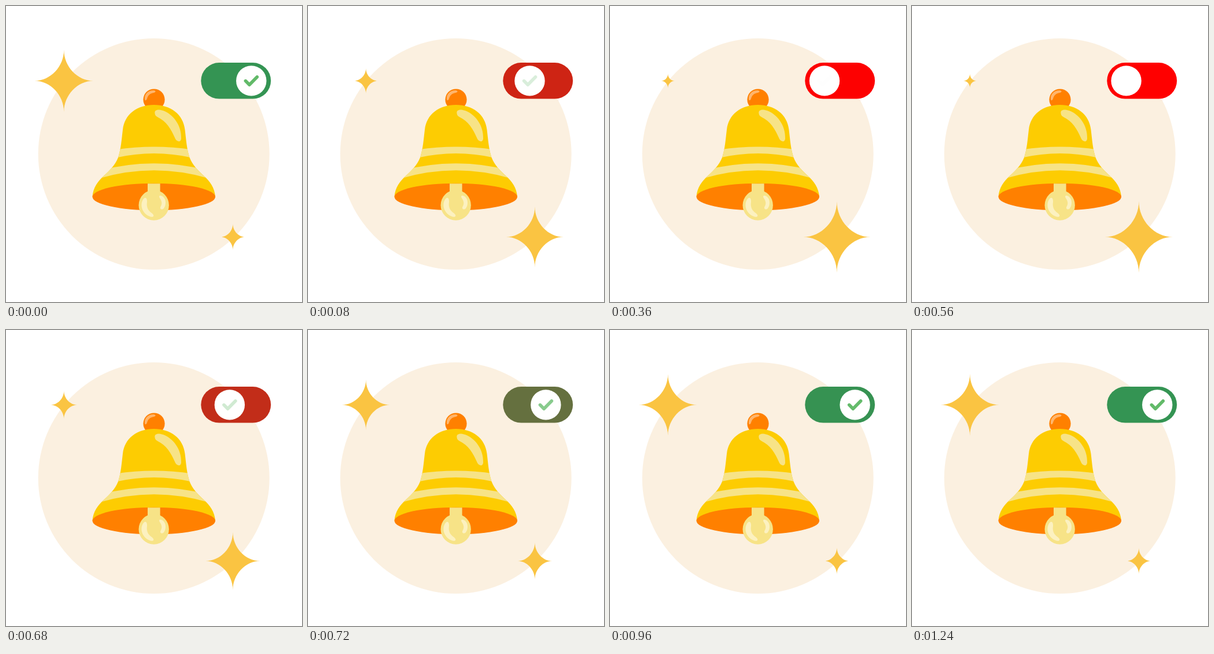
An HTML page with a canvas that plays this animation: 512 px wide and 512 px high, repeating every 1380 ms.

```html
<!DOCTYPE html>
<html lang="en">
<head>
<meta charset="utf-8">
<title>Notification toggle</title>
<style>
  html, body { margin: 0; width: 100%; height: 100%; overflow: hidden; background: #fff; }
  canvas { display: block; width: 100vmin; height: 100vmin; }
</style>
</head>
<body>
<canvas id="stage" width="512" height="512"></canvas>
<script>
const ctx = document.getElementById('stage').getContext('2d');
const LOOP = 1380, FLIP = 640, STEP = 40;
const GOLD = '#fac442', YELLOW = '#fdcc02', CREAM = '#f7e387', PALE = '#fcf1c0', ORANGE = '#ff8000';
const ON = [52, 148, 83], OFF = [255, 0, 0];

const body = new Path2D(`M255.8 171 C227 171 205 187 202 214 C200 230 199 247 194 262
  C189 275 179 285 169 294 C159 303 150.5 314 149.5 330 H362
  C361 314 352.5 303 342.5 294 C332.5 285 322.5 275 317.5 262
  C312.5 247 311.5 230 309.5 214 C306.5 187 284.5 171 255.8 171 Z`);
const bands = new Path2D(`M190 248.5 Q256 238.5 322 248.5 V262.5 Q256 247.5 190 262.5 Z
  M160 285 Q256 259.5 352 285 V298.5 Q256 270 160 298.5 Z`);
const bodyShine = new Path2D(`M257.5 186 C256 179 264 178 272 181 C288 187 304 205 303 230
  C302 236 296 235 293 230 C285 212 278 200 262 192 C259 190 258 189 257.5 186 Z`);
const knobShine = new Path2D(`M240 161 C239 152 247 145 256 146 C260 147 259 149 256 150
  C249 151 246 154 244 160 C243 164 240 164 240 161 Z`);
const clapperShine = new Path2D(`M238.5 333 C231 341 233.5 359 250 364.5 C256 366 257 362 252.5 358.5
  C244 353 243 346 244 339 C244.5 333 241.5 330 238.5 333 Z
  M267 328 C276.5 329 278.5 343 273 350 C269.5 353.5 265.5 351 267.5 347
  C270.5 342 269.5 338 266.5 333 C264.5 330 264.5 328 267 328 Z`);

const lerp = (a, b, p) => a + (b - a) * p;
const clamp = v => Math.min(1, Math.max(0, v));

function fill(path, color) {
  ctx.fillStyle = color;
  ctx.fill(path);
}

function oval(x, y, rx, ry, color) {
  const path = new Path2D();
  path.ellipse(x, y, rx, ry, 0, 0, Math.PI * 2);
  fill(path, color);
}

// Underdamped spring from 0 to 1, time in ms
function spring(ms) {
  const t = ms / 1000, decay = 13.75, freq = decay * Math.SQRT2;
  return 1 - Math.exp(-decay * t) * (Math.cos(freq * t) + decay / freq * Math.sin(freq * t));
}

// Four tips joined by concave arcs
function star(x, y, rx, ry) {
  const bend = 0.46;
  const tips = [[0, -1], [1, 0], [0, 1], [-1, 0]];
  const path = new Path2D();
  path.moveTo(x, y - ry);
  tips.forEach(([ax, ay], i) => {
    const [bx, by] = tips[(i + 1) % 4];
    path.bezierCurveTo(
      x + ax * bend * rx, y + ay * bend * ry,
      x + bx * bend * rx, y + by * bend * ry,
      x + bx * rx, y + by * ry);
  });
  fill(path, GOLD);
}

function bell() {
  oval(256, 162, 18.6, 18.6, ORANGE);
  fill(knobShine, '#ffb56b');
  fill(body, YELLOW);
  ctx.save();
  ctx.clip(body);
  fill(bands, CREAM);
  ctx.restore();
  fill(bodyShine, CREAM);
  oval(255.8, 330.1, 106.3, 23.3, ORANGE);
  ctx.fillStyle = CREAM;
  ctx.fillRect(245, 307.2, 21.6, 20);
  oval(255.7, 344.5, 26.2, 26.2, CREAM);
  fill(clapperShine, PALE);
}

function toggle(p) {
  const mix = clamp(p), x = lerp(424.3, 370.6, p), y = 129.4;
  const track = new Path2D();
  track.roundRect(337.3, 98, 120.9, 62.6, 31.3);
  fill(track, `rgb(${ON.map((c, i) => Math.round(lerp(c, OFF[i], mix)))})`);
  oval(x, y, 26.2, 26.2, '#fff');
  ctx.save();
  ctx.globalAlpha = 1 - mix;
  ctx.strokeStyle = '#62ba69';
  ctx.lineWidth = 5.6;
  ctx.lineCap = ctx.lineJoin = 'round';
  ctx.beginPath();
  ctx.moveTo(x - 9.9, y + 0.2);
  ctx.lineTo(x - 3.3, y + 6.8);
  ctx.lineTo(x + 10, y - 6.6);
  ctx.stroke();
  ctx.restore();
}

function draw(time) {
  const t = Math.floor(time % LOOP / STEP) * STEP;
  const p = t < FLIP ? spring(t) : 1 - spring(t - FLIP);
  ctx.fillStyle = '#fff';
  ctx.fillRect(0, 0, 512, 512);
  oval(255.7, 256, 200, 200, '#fbf0e0');
  bell();
  star(100.2, 129.5, lerp(50.8, 11.3, p), lerp(53.7, 12, p));
  star(392.4, 399.6, lerp(21.3, 58.6, p), lerp(22.8, 62, p));
  toggle(p);
}

const start = performance.now();
function tick() {
  draw(performance.now() - start);
  requestAnimationFrame(tick);
}
tick();
</script>
</body>
</html>
```
